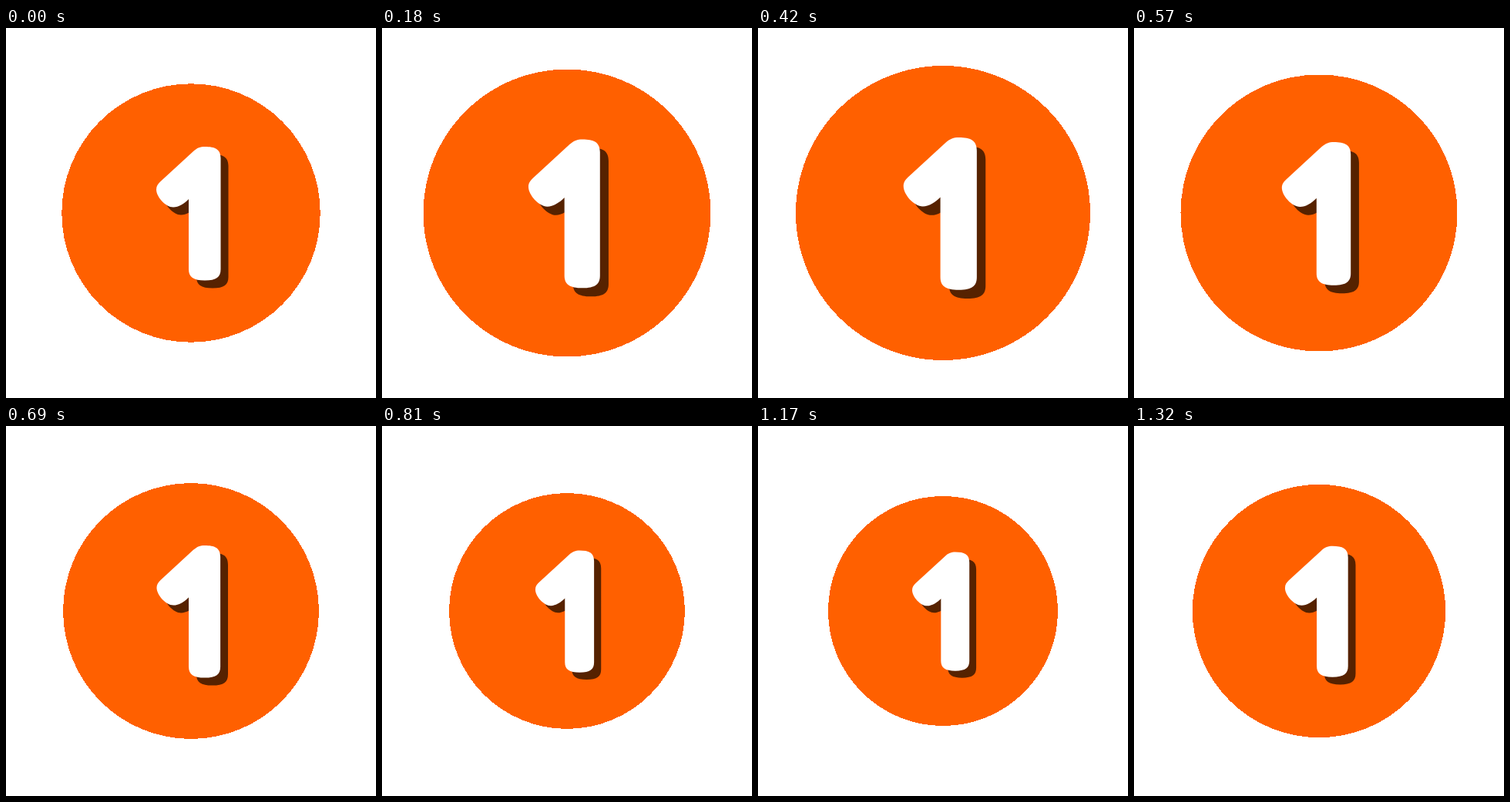
These frames come from a looping animation (480 by 480 pixels, 1350 ms). An HTML page:

```html
<!DOCTYPE html>
<html lang="en">
<head>
<meta charset="utf-8">
<title>Pulsing number badge</title>
<style>
  html, body { margin: 0; height: 100%; overflow: hidden; background: #fff; }
  svg { display: block; width: 100vw; height: 100vh; }
  .shadow { fill: #562200; filter: blur(.6px); }
</style>
</head>
<body>
<svg viewBox="-240 -240 480 480">
  <defs>
    <path id="one" d="M-3-18C-9-12-16-7.5-23-7.5C-33-7.5-45-21-45-30.5C-45-35-43-37.5-40-40.5
      L3-80C8-84.5 12-86 18-86C31-86 38.5-83 38.5-71V73C38.5 83 33 87.5 18 87.5C3 87.5-3 83-3 73Z"/>
  </defs>
  <g id="badge">
    <circle r="167.7" fill="#ff6000" shape-rendering="crispEdges"/>
    <use href="#one" x="10" y="10" class="shadow"/>
    <use href="#one" fill="#fff"/>
  </g>
</svg>
<script>
  const LOOP = 1350, STEP = 30, SWING = 0.15;
  const badge = document.getElementById('badge');
  const start = performance.now();

  function draw() {
    const elapsed = (performance.now() - start) % LOOP;
    const time = Math.floor(elapsed / STEP) * STEP;
    const scale = 1 + SWING * Math.sin(2 * Math.PI * time / LOOP);
    badge.setAttribute('transform', `scale(${scale})`);
    requestAnimationFrame(draw);
  }
  draw();
</script>
</body>
</html>
```
